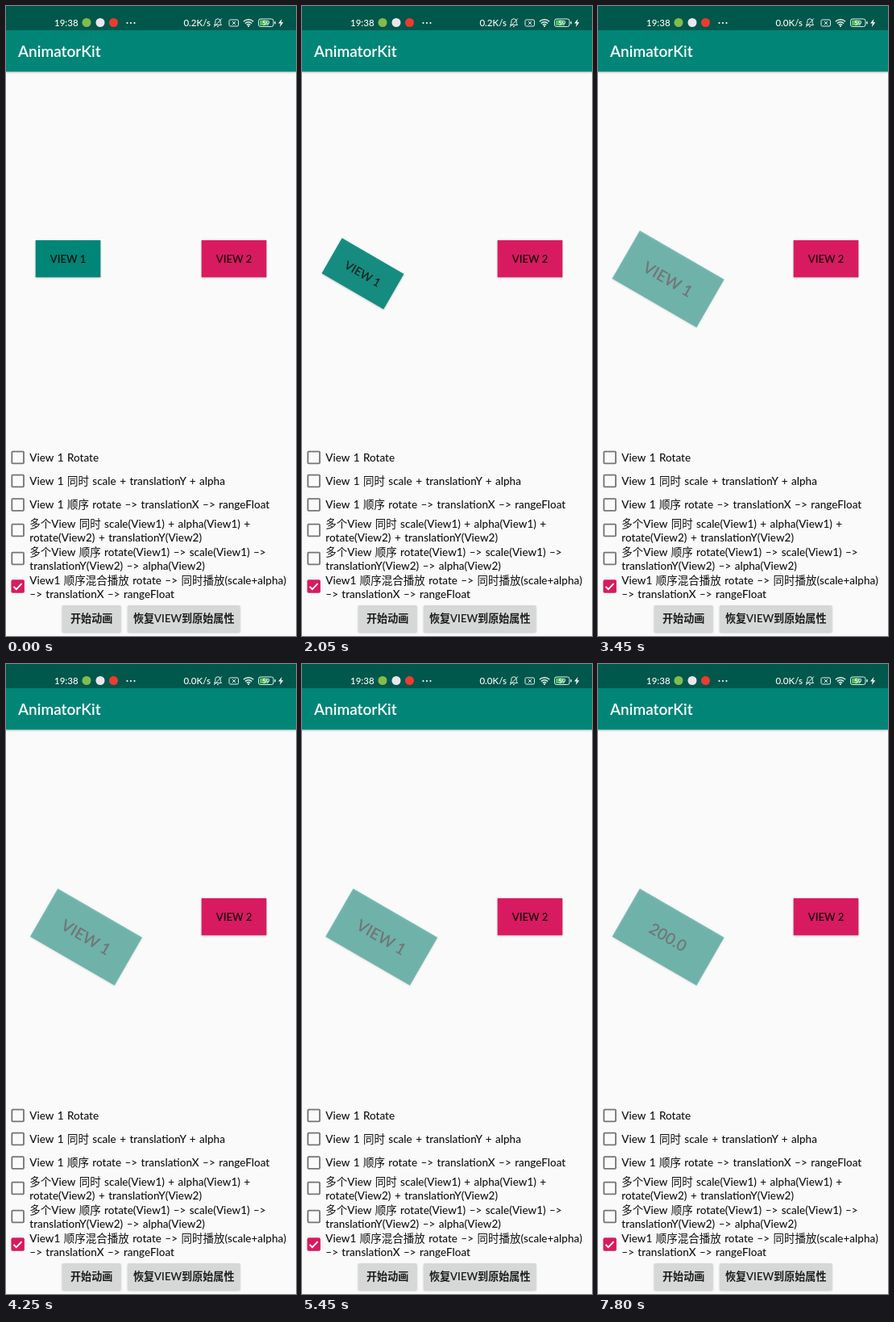
An HTML page that plays this animation: 360 by 780 pixels, repeating every 7850 ms.

```html
<!DOCTYPE html>
<html lang="zh-CN">
<head>
<meta charset="utf-8">
<title>AnimatorKit</title>
<style>
  html, body { margin: 0; width: 100%; height: 100%; overflow: hidden; background: #fafafa; }
  svg { display: block; width: 100%; height: 100%; }
  text { font-family: Lato, "Noto Sans CJK SC", "Noto Sans CJK", sans-serif; white-space: pre; }
  .status { font-size: 11.5px; font-weight: 500; fill: #fff; }
  .title { font-size: 19px; font-weight: 600; fill: #fff; }
  .item { font-size: 13.5px; font-weight: 500; word-spacing: 1px; fill: #111; }
  .label { font-size: 13.1px; font-weight: 600; fill: #000; fill-opacity: .87; text-anchor: middle; }
  .card { filter: drop-shadow(0 1px 1.2px rgba(0, 0, 0, .22)); }
  .line { fill: none; stroke: #e6efee; stroke-width: 1; }
</style>
</head>
<body>
<svg id="stage" viewBox="0 0 360 780">
  <rect width="360" height="780" fill="#fafafa"/>
  <g class="card">
    <rect y="30" width="360" height="51.33" fill="#008577"/>
  </g>
  <rect width="360" height="30" fill="#00574b"/>

  <text class="status" x="60" y="25">19:38</text>
  <circle cx="100" cy="20.5" r="5.5" fill="#82bd4b"/>
  <circle cx="117" cy="20.5" r="5.5" fill="#e9e6ee"/>
  <circle cx="133.5" cy="20.5" r="5.5" fill="#ee3b30"/>
  <g fill="#fff">
    <circle cx="150.5" cy="21" r="1.1"/>
    <circle cx="155" cy="21" r="1.1"/>
    <circle cx="159.5" cy="21" r="1.1"/>
  </g>
  <text class="status" id="speed" x="254" y="25" text-anchor="end"></text>
  <g class="line">
    <path d="M258.5 23.5h9l-1.3-2v-2.5a3.2 3.2 0 0 0-6.4 0v2.5zM262 25.5h2M258 26l10-10.5"/>
    <rect x="277" y="17" width="11.5" height="8" rx="1.5"/>
    <path d="M281 19l4 4m0-4l-4 4"/>
    <path d="M294.8 19.2a9 9 0 0 1 12.4 0M296.8 21.5a6 6 0 0 1 8.4 0M298.8 23.5a3.2 3.2 0 0 1 4.4 0" stroke-width="1.4"/>
    <rect x="313.5" y="16" width="18.5" height="9.5" rx="2.5"/>
    <path d="M334 19.2v3" stroke-width="1.5"/>
  </g>
  <circle cx="301" cy="25" r="1" fill="#fff"/>
  <rect x="315" y="17.5" width="9.5" height="6.5" rx="1" fill="#4cc05a"/>
  <text x="322.8" y="23.8" font-size="8" font-weight="700" fill="#fff" text-anchor="middle">59</text>
  <path d="M342.5 16l-4.500 5.500h2.800l-1 4.500 4.500-5.800h-2.800z" fill="#fff"/>

  <text class="title" x="15" y="63">AnimatorKit</text>
  <g id="list"></g>
  <g id="buttons"></g>
  <g id="views"></g>
</svg>
<script>
const LOOP = 7850;
const TEAL = '#008577', PINK = '#d81b60', GREY = '#d6d7d7';
const PIVOT = { x: 43.5, y: 313 };
const $ = id => document.getElementById(id);

function add(parent, tag, attrs, content) {
  const el = document.createElementNS('http://www.w3.org/2000/svg', tag);
  for (const key in attrs) el.setAttribute(key, attrs[key]);
  if (content) el.textContent = content;
  parent.appendChild(el);
  return el;
}

function button(parent, x, y, width, height, fill, label, rx = 0) {
  const card = add(parent, 'g', { class: 'card' });
  const body = add(card, 'g', {});
  const face = add(body, 'rect', { x, y, width, height, fill, rx });
  const text = add(body, 'text', { class: 'label', x: x + width / 2, y: y + height / 2 + 4.9 }, label);
  return { body, face, text };
}

// Each item: checkbox centre, then [baseline, text] lines.
const items = [
  [559, [564, 'View 1 Rotate']],
  [588, [593, 'View 1 同时 scale + translationY + alpha']],
  [617.5, [622, 'View 1 顺序 rotate –> translationX –> rangeFloat']],
  [649, [646, '多个View 同时 scale(View1) + alpha(View1) +'], [663, 'rotate(View2) + translationY(View2)']],
  [684, [681, '多个View 顺序 rotate(View1) –> scale(View1) –>'], [697.5, 'translationY(View2) –> alpha(View2)']],
  [718.5, [715.5, 'View1 顺序混合播放 rotate –> 同时播放(scale+alpha)'], [732.5, '–> translationX –> rangeFloat']]
];

items.forEach(([cy, ...lines], i) => {
  const checked = i === items.length - 1;
  const color = checked ? PINK : '#757575';
  add($('list'), 'rect', {
    x: 7.33, y: cy - 7.33, width: 14.67, height: 14.67, rx: 1,
    fill: checked ? color : 'none', stroke: color, 'stroke-width': 1.83
  });
  if (checked) add($('list'), 'path', {
    d: `M9.5 ${cy + .3}l3.3 3.4 6.7-7`, fill: 'none', stroke: '#fff', 'stroke-width': 1.9
  });
  for (const [y, text] of lines) add($('list'), 'text', { class: 'item', x: 29.3, y }, text);
});

const start = button($('buttons'), 69.7, 742, 73, 33, GREY, '开始动画', 1.5);
button($('buttons'), 151, 742, 139.5, 33, GREY, '恢复VIEW到原始属性', 1.5);
const view1 = button($('views'), 36.67, 290, 80.67, 45.83, TEAL, 'VIEW 1');
button($('views'), 242.67, 290, 80.67, 45.83, PINK, 'VIEW 2');

const progress = (t, from, to) => Math.min(1, Math.max(0, (t - from) / (to - from)));

// Piecewise linear through evenly spaced values.
function through(p, ...values) {
  const pos = p * (values.length - 1);
  const i = Math.min(Math.floor(pos), values.length - 2);
  return values[i] + (values[i + 1] - values[i]) * (pos - i);
}

function render(t) {
  const angle = through(progress(t, 400, 1800), 0, 90, 30);
  const grow = progress(t, 1800, 3050);
  const scale = through(grow, 1, 1.5);
  const shift = through(progress(t, 3900, 5780), 0, 33.3, 0);
  const count = progress(t, 5780, 6950);

  view1.body.setAttribute('transform',
    `translate(${PIVOT.x + shift} ${PIVOT.y}) rotate(${angle}) scale(${scale}) translate(${-PIVOT.x} ${-PIVOT.y})`);
  view1.body.setAttribute('opacity', through(grow, 1, .5));
  view1.text.textContent = count > 0 ? through(count, 100, 200).toFixed(1) : 'VIEW 1';

  const pressed = t >= 420 && t < 1200;
  start.face.setAttribute('fill', pressed ? '#cbcccc' : GREY);
  $('speed').textContent = t < 3450 ? '0.2K/s' : '0.0K/s';
}

const begin = performance.now();
function tick() {
  render((performance.now() - begin) % LOOP);
  requestAnimationFrame(tick);
}
tick();
</script>
</body>
</html>
```
